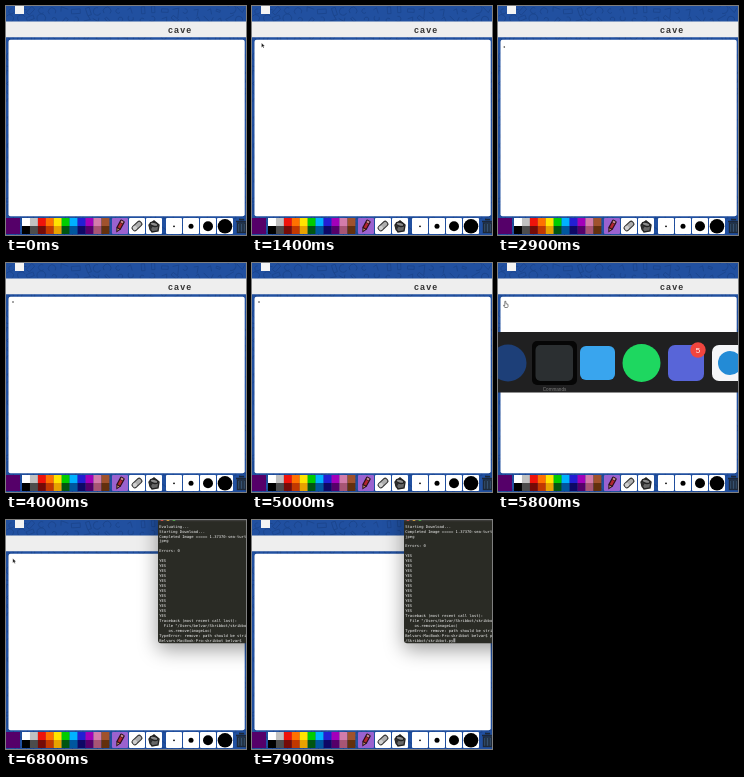
Animation of 240 by 229 pixels, one loop 8 s. Source, as an HTML page with a canvas:

```html
<!DOCTYPE html>
<html lang="en">
<head>
<meta charset="utf-8">
<title>Drawing game</title>
<style>
html, body { margin: 0; width: 100%; height: 100%; overflow: hidden; background: #2152a2; }
canvas { display: block; width: 240px; height: 229px; }
</style>
</head>
<body>
<canvas id="stage"></canvas>
<script>
const W = 240, H = 229, LOOP = 8000;
const canvas = document.getElementById('stage');
const ctx = canvas.getContext('2d');
const dpr = window.devicePixelRatio || 1;
canvas.width = Math.round(W * dpr);
canvas.height = Math.round(H * dpr);

const SANS = '"Liberation Sans", Arial, sans-serif';
const MONO = '"DejaVu Sans Mono", monospace';
const LIGHT = ['#fff', '#c1c1c1', '#ef130b', '#ff7100', '#ffe400', '#00cc00',
  '#00b2ff', '#231fd3', '#a300ba', '#d37caa', '#a0522d'];
const DARK = ['#000', '#4c4c4c', '#740b07', '#c23800', '#e8a200', '#005510',
  '#00569e', '#0e0865', '#550069', '#a75574', '#63300d'];

const LOG = [
  'Evaluating...',
  'Starting Download...',
  'Completed Image ===== 1.37370-sea-turtle.',
  'jpeg',
  '',
  'Errors: 0',
  '',
  ...Array(12).fill('YES'),
  'Traceback (most recent call last):',
  '  File "/Users/belvar/Skribbot/skribbot.py"',
  '    os.remove(imageLoc)',
  'TypeError: remove: path should be string'
];
const PROMPT = 'Belvars-MacBook-Pro:skribbot belvar$ ';

function rect(x, y, w, h, fill, r = 0) {
  ctx.fillStyle = fill;
  ctx.beginPath();
  ctx.roundRect(x, y, w, h, r);
  ctx.fill();
}

function disc(x, y, r, fill) {
  ctx.fillStyle = fill;
  ctx.beginPath();
  ctx.arc(x, y, r, 0, Math.PI * 2);
  ctx.fill();
}

function poly(points, fill, stroke, width = 0.7) {
  ctx.beginPath();
  points.forEach(([x, y]) => ctx.lineTo(x, y));
  ctx.closePath();
  if (fill) { ctx.fillStyle = fill; ctx.fill(); }
  if (stroke) { ctx.strokeStyle = stroke; ctx.lineWidth = width; ctx.stroke(); }
}

function label(str, x, y, font, fill, align = 'left') {
  ctx.font = font;
  ctx.fillStyle = fill;
  ctx.textAlign = align;
  ctx.fillText(str, x, y);
}

function at(x, y, angle, draw) {
  ctx.save();
  ctx.translate(x, y);
  ctx.rotate(angle);
  draw();
  ctx.restore();
}

function wallpaper() {
  rect(0, 0, W, H, '#2150a0');
  let seed = 17;
  const rnd = () => (seed = (seed * 16807) % 2147483647) / 2147483647;
  ctx.strokeStyle = '#1c468e';
  ctx.lineWidth = 0.9;
  for (let y = 3; y < H; y += 9) {
    for (let x = 2; x < W; x += 11) {
      const kind = rnd(), size = 2 + rnd() * 2.5;
      at(x + rnd() * 4, y + rnd() * 3, rnd() * 6, () => {
        ctx.beginPath();
        if (kind < 0.35) ctx.arc(0, 0, size, 0, 4.5);
        else if (kind < 0.7) ctx.rect(-size, -size / 2, size * 2, size);
        else { ctx.moveTo(-size, 0); ctx.lineTo(0, -size); ctx.lineTo(size, size); }
        ctx.stroke();
      });
    }
  }
}

function pencil() {
  at(114, 219.8, 0.5, () => {
    rect(-2.5, -6.2, 5, 9.6, '#2a1018', 1.3);
    rect(-1.3, -5.2, 2.6, 2, '#c98a92');
    rect(-1.3, -2.8, 2.6, 5.6, '#b3262f');
    poly([[-1.9, 3], [1.9, 3], [0, 6.6]], '#c99a70', '#2a1018', 1);
  });
}

function eraser() {
  at(131, 220, -0.75, () => {
    rect(-6, -3.1, 12, 6.2, '#333', 2.4);
    rect(-4.9, -2, 9.8, 4, '#adadad', 1.5);
    rect(-4.9, -2, 4, 4, '#cfcfcf', 1.5);
  });
}

function bucket() {
  poly([[143, 219], [148, 215], [153, 219], [152, 225], [146, 226], [144, 223]], '#666', '#222', 1.4);
  ctx.beginPath();
  ctx.ellipse(148, 218.3, 4, 2, 0.2, 0, 7);
  ctx.fillStyle = '#8c8c8c';
  ctx.fill();
  ctx.stroke();
  poly([[143, 219], [147, 220], [144, 225]], '#2c2c2c');
}

function trash() {
  ctx.strokeStyle = '#1d2838';
  ctx.lineWidth = 1.4;
  rect(231.5, 217, 8, 9.5, '#35506f');
  ctx.strokeRect(231.5, 217, 8, 9.5);
  ctx.beginPath();
  ctx.moveTo(230, 215.5); ctx.lineTo(241, 215.5);
  ctx.moveTo(233, 213.5); ctx.lineTo(238, 213.5);
  for (const x of [234, 237]) { ctx.moveTo(x, 218); ctx.lineTo(x, 226); }
  ctx.stroke();
}

function page() {
  wallpaper();
  rect(9, -1, 9, 9, '#f4f4f4');
  rect(0, 15.6, W, 15.6, '#eee');
  ctx.letterSpacing = '1.2px';
  label('cave', 162, 27.2, 'bold 8.8px ' + SANS, '#333');
  ctx.letterSpacing = '0px';
  rect(2.5, 33.7, 236.2, 176.5, '#fff', 2);

  rect(0, 212, 14, 16, '#550069');
  LIGHT.forEach((c, i) => {
    rect(16 + i * 7.94, 212, 8, 8, c);
    rect(16 + i * 7.94, 220, 8, 8, DARK[i]);
  });
  [106, 123, 140, 160, 177, 194, 211].forEach((x, i) =>
    rect(x, 212, 16, 16, i ? '#fff' : '#9b62cf', 1));
  pencil();
  eraser();
  bucket();
  [0.9, 2.5, 5, 7.3].forEach((r, i) => disc(168 + i * 17, 220.3, r, '#000'));
  trash();
}

function switcher() {
  rect(0, 69, W, 60.5, '#202021');
  disc(10, 100, 18.5, '#1d3f78');
  rect(34, 78, 45, 44, '#060606', 5);
  rect(37.5, 82, 37.5, 36, '#2b2f31', 5);
  label('Commands', 56.5, 128, '4.6px ' + SANS, '#808080', 'center');
  rect(82, 83, 35, 34, '#39a5ee', 6);
  disc(143.5, 100, 19, '#1ed760');
  rect(170, 82, 36, 36, '#5865d8', 7);
  disc(200, 87, 7.7, '#f0453e');
  label('5', 200, 90, '8px ' + SANS, '#fff', 'center');
  rect(214, 82, 36, 36, '#f5f6f8', 7);
  disc(232, 100, 12, '#238bd6');
}

function shell(recalled) {
  ctx.save();
  ctx.shadowColor = 'rgba(0,0,0,0.4)';
  ctx.shadowBlur = 20 * dpr;
  ctx.shadowOffsetY = 6 * dpr;
  rect(152, -20, 130, 143.2, '#2a2b25', 3);
  ctx.restore();
  rect(152, 0, 88, 1.2, '#3c3c3a');
  ['#d9534c', '#d9a33a', '#4fae48'].forEach((c, i) => disc(156 + i * 6, -0.6, 1.7, c));

  const lines = [...LOG, PROMPT];
  if (recalled) {
    lines.shift();
    lines[lines.length - 1] += 'python3 ~';
    lines.push('/Skribbot/skribbot.py');
  }
  lines.forEach((s, i) => label(s, 153.3, 7.6 + i * 4.96, '3.8px ' + MONO, '#f2f2f2'));
  const end = recalled ? 153.3 + ctx.measureText(lines[lines.length - 1]).width : W;
  rect(end, 118.3, 2, 4, '#9a9a9a');
}

function arrow(x, y) {
  at(x, y, 0, () => poly([[0, 0], [0, 4.4], [1.1, 3.5], [1.9, 5.1], [2.6, 4.7], [1.9, 3.2], [3.2, 3.1]],
    '#111', '#fff', 0.3));
}

function hand(x, y) {
  at(x, y, 0, () => poly([[-1, -3], [0, -3], [0.2, -0.6], [2.2, 0], [2.2, 2.2], [1.6, 3.2], [-1, 3.2], [-2.3, 1], [-1, 1.2]],
    '#fff', '#333', 0.6));
}

function pointer(t) {
  if (t < 1000 || t >= 7300) return;
  if (t < 1900) arrow(9.5, 37);
  else if (t < 3700) disc(6.3, 41, 0.8, '#333');
  else if (t < 5500) disc(7, 39, 0.8, '#333');
  else if (t < 6300) hand(7.8, 41.3);
  else arrow(6.8, 38.5);
}

function render(t) {
  ctx.setTransform(dpr, 0, 0, dpr, 0, 0);
  page();
  if (t >= 5500 && t < 6300) switcher();
  if (t >= 6300) shell(t >= 7300);
  pointer(t);
}

const start = performance.now();
function tick() {
  const t = (performance.now() - start) % LOOP;
  render(Math.floor(t / 100) * 100);
  requestAnimationFrame(tick);
}
tick();
</script>
</body>
</html>
```
